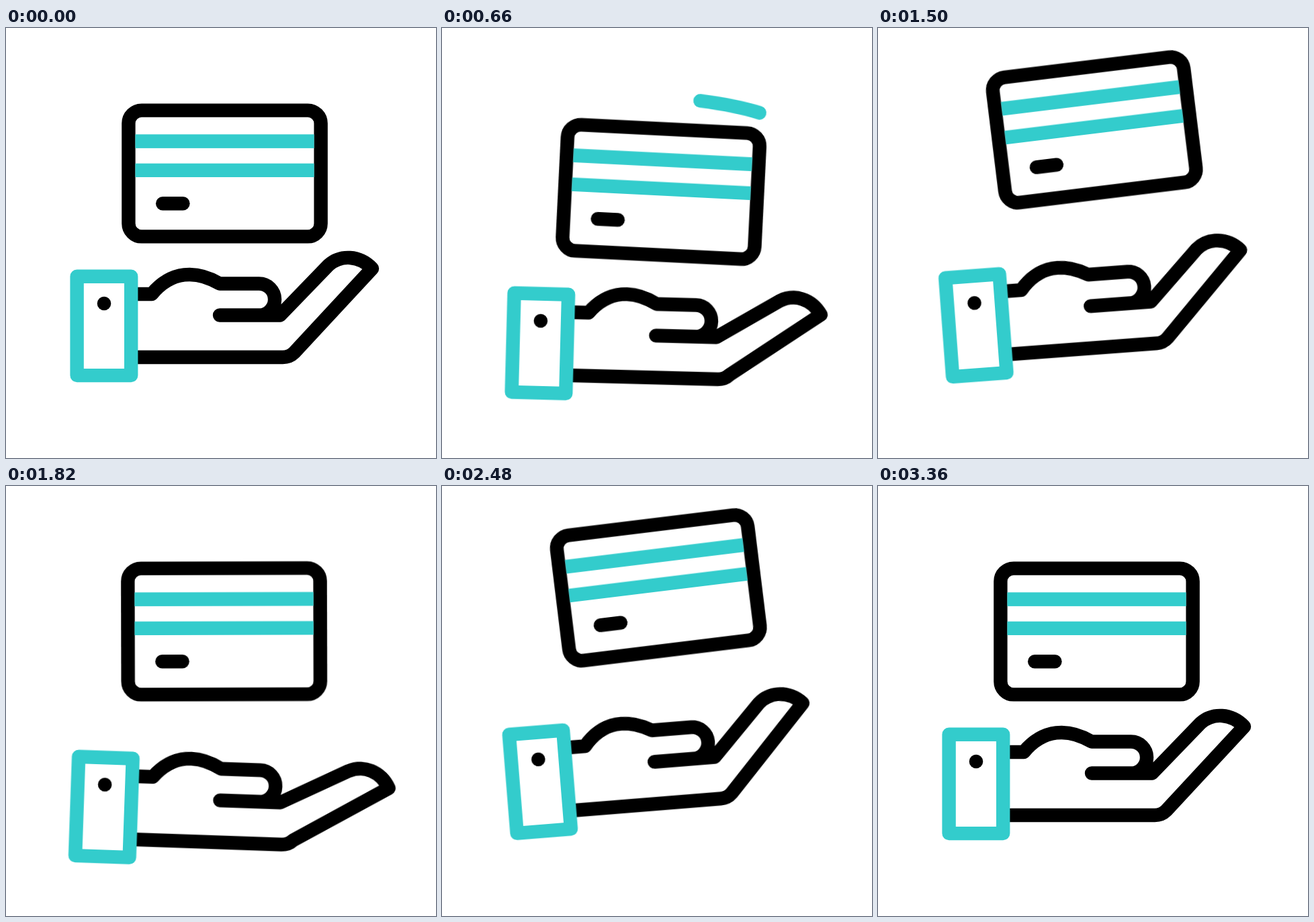
These frames come from a looping animation (640x640 px, 3600 ms). An HTML page:

```html
<!DOCTYPE html>
<html lang="en">
<head>
<meta charset="utf-8">
<title>Card toss</title>
<style>
  @property --head { syntax: "<number>"; inherits: false; initial-value: 0; }
  @property --tail { syntax: "<number>"; inherits: false; initial-value: 0; }

  html, body { margin: 0; width: 100%; height: 100%; overflow: hidden; background: #fff; }
  svg { display: block; width: 100%; height: 100%; }

  .ink { fill: #fff; stroke: #000; }
  .teal { fill: none; stroke: #3cc; }
  .ink, .teal { stroke-width: 20.4; stroke-linecap: round; stroke-linejoin: round; }
  .stripe { fill: #3cc; }

  .card, .hand, .palm, .arc {
    animation: 3600ms cubic-bezier(.3333, 0, .6667, 1) infinite;
  }
  .card { transform-origin: 325.5px 216.5px; animation-name: toss; }
  .hand { transform-origin: 146px 443.5px; animation-name: throw; }
  .palm { animation-name: bend; }
  .arc {
    stroke-dasharray: calc((var(--head) - var(--tail)) * 1px) 300px;
    stroke-dashoffset: calc(var(--tail) * -1px);
    animation-name: head, tail, show;
    animation-timing-function: cubic-bezier(.3333, 0, .6667, 1), cubic-bezier(.3333, 0, .6667, 1), step-end;
  }

  @keyframes toss {
    0%, 4.72%, 89.72%, 100% { transform: translate(0, 0) rotate(0deg); }
    31.67%, 58.75% { transform: translate(1.2px, 54px) rotate(5.6deg); }
    41.39%, 68.47% { transform: translate(-3.4px, -65px) rotate(-7deg); }
  }

  @keyframes throw {
    0%, 10.42%, 80.56%, 100% { transform: translate(0, 0) rotate(0deg); }
    22.22%, 50.83% { transform: translate(0, 34.5px) rotate(2deg); }
    33.06% { transform: translate(0, -19.2px) rotate(.25deg); }
    60.83% { transform: translate(0, -18.9px) rotate(-.25deg); }
    40%, 67.78% { transform: translate(0, -3.3px) rotate(-4.7deg); }
  }

  /* fingers flatten while the base of the palm stays put */
  @keyframes bend {
    0%, 10.42%, 32.78%, 40%, 66.67%, 100% {
      d: path("M186 396H217C246 361 283 360 318 380.5H376.5A23.5 23.5 0 0 1 376.5 427.5H318H408L480 353C498 337 526 338 545 358L429 483Q422 490 412 490H186");
    }
    22.22%, 50.83%, 55.56% {
      d: path("M186 396H217C246 361 283 360 318 380.5H376.5A23.5 23.5 0 0 1 376.5 427.5H318H408L507.7 377.2C529.6 367.1 556.1 376.1 568.5 400.7L429 483Q422 490 412 490H186");
    }
  }

  @keyframes head {
    0%, 5.56% { --head: 0; }
    38.33%, 45% { --head: 100; }
    45.01%, 79.72% { --head: 0; }
    88.89%, 95% { --head: 60; }
    95.01%, 100% { --head: 0; }
  }

  @keyframes tail {
    0%, 17.22% { --tail: 0; }
    41.11%, 45% { --tail: 100; }
    45.01%, 83.89% { --tail: 0; }
    93.33%, 95% { --tail: 60; }
    95.01%, 100% { --tail: 0; }
  }

  @keyframes show {
    0%, 41%, 93.3%, 100% { opacity: 0; }
    6.2%, 79.9% { opacity: 1; }
  }
</style>
</head>
<body>
<svg viewBox="0 0 640 640">
  <g class="card">
    <rect class="ink" x="182.4" y="122.6" width="286.2" height="187.8" rx="19.5"/>
    <rect class="stripe" x="192.4" y="158.3" width="266.2" height="20.6"/>
    <rect class="stripe" x="192.4" y="201.6" width="266.2" height="20.4"/>
    <path class="ink" d="M233.2 261.3H263.4"/>
    <path class="teal arc" pathLength="100" d="M375 78C480 86 563 108 563 205V222"/>
  </g>
  <g class="hand">
    <path class="ink palm" d="M186 396H217C246 361 283 360 318 380.5H376.5A23.5 23.5 0 0 1 376.5 427.5H318H408L480 353C498 337 526 338 545 358L429 483Q422 490 412 490H186"/>
    <rect class="teal" style="fill:#fff" x="105.6" y="369.7" width="80.6" height="147.4"/>
    <circle cx="146" cy="410" r="10.3"/>
  </g>
</svg>
</body>
</html>
```
